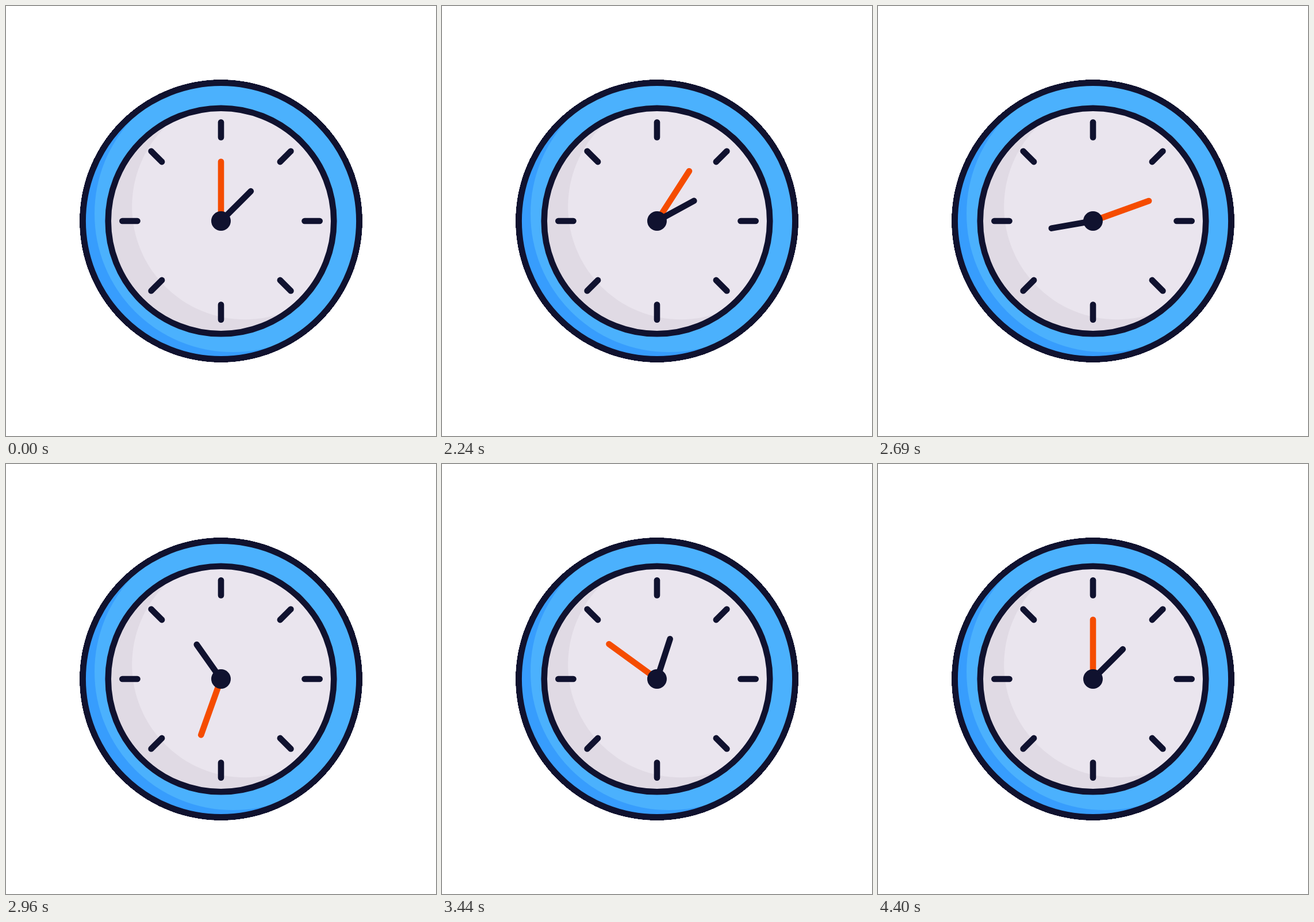
Animation of 748x748 px, one loop 4490 ms. Source, as an HTML page:

```html
<!DOCTYPE html>
<html lang="en">
<head>
<meta charset="utf-8">
<title>Clock</title>
<style>
  html, body { margin: 0; width: 100%; height: 100%; overflow: hidden; background: #fff; }
  svg { display: block; width: 100%; height: 100%; }
  .line { stroke: #10122f; stroke-width: 10.6; stroke-linecap: round; fill: none; }
  #minute { stroke: #f54c00; }
</style>
</head>
<body>
<svg viewBox="0 0 748 748">
  <defs>
    <clipPath id="rim"><circle cx="374" cy="374" r="240.5"/></clipPath>
    <clipPath id="face"><circle cx="374" cy="374" r="196.3"/></clipPath>
  </defs>
  <circle cx="374" cy="374" r="245.8" fill="#10122f" shape-rendering="crispEdges"/>
  <g clip-path="url(#rim)">
    <circle cx="374" cy="374" r="240.5" fill="#379dfd"/>
    <circle cx="394.5" cy="361.5" r="240.5" fill="#4bb1fd"/>
  </g>
  <circle class="line" cx="374" cy="374" r="240.4"/>
  <g clip-path="url(#face)">
    <circle cx="374" cy="374" r="196.3" fill="#e0dae4"/>
    <circle cx="415.5" cy="349" r="196.3" fill="#eae5ee"/>
  </g>
  <circle class="line" cx="374" cy="374" r="196.3"/>
  <g transform="translate(374 374)">
    <g id="ticks"></g>
    <path id="minute" class="line" d="M0 0V-103.3"/>
    <path id="hour" class="line" d="M0 0V-73.3" transform="rotate(45)"/>
    <circle r="17" fill="#10122f"/>
  </g>
</svg>
<script>
  const LOOP = 4490, START = 2000, LENGTH = 2400, STEP = 30;
  const $ = id => document.getElementById(id);
  const turn = (el, deg) => el.setAttribute('transform', `rotate(${deg})`);

  for (let i = 0; i < 8; i++) {
    const tick = document.createElementNS('http://www.w3.org/2000/svg', 'path');
    tick.setAttribute('class', 'line');
    tick.setAttribute('d', 'M0 -145.5V-171.7');
    turn(tick, i * 45);
    $('ticks').append(tick);
  }

  // cubic-bezier(1/3, 0, 0, 1), solved by bisection
  function ease(x) {
    if (x <= 0 || x >= 1) return x <= 0 ? 0 : 1;
    let lo = 0, hi = 1;
    for (let i = 0; i < 30; i++) {
      const s = (lo + hi) / 2;
      if (s * (1 - s) ** 2 + s ** 3 < x) lo = s; else hi = s;
    }
    return lo * lo * (3 - 2 * lo);
  }

  // The hands advance in 30 ms ticks; the small bias absorbs timer rounding.
  function draw() {
    const t = performance.now() % LOOP - START;
    const p = ease(Math.floor((t + 2) / STEP) * STEP / LENGTH);
    turn($('minute'), 720 * p);
    turn($('hour'), 45 + 360 * p);
    requestAnimationFrame(draw);
  }
  draw();
</script>
</body>
</html>
```
